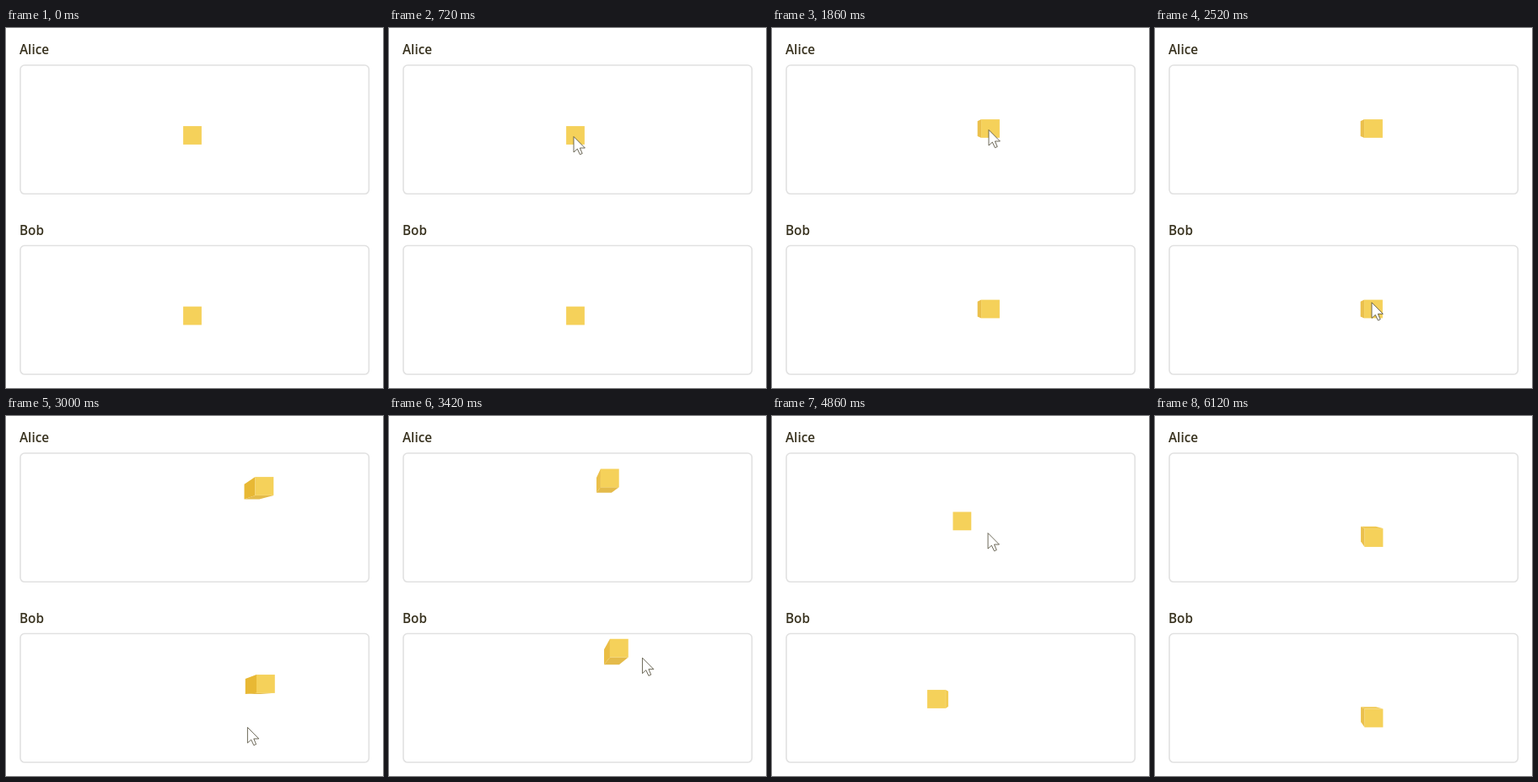
These frames come from a looping animation (447 by 426 pixels, 6180 ms). An HTML page with a canvas:

```html
<!DOCTYPE html>
<html lang="en">
<head>
<meta charset="utf-8">
<title>Shared cube</title>
<style>
html, body { margin: 0; width: 100%; height: 100%; overflow: hidden; background: #fff; }
canvas { display: block; }
</style>
</head>
<body>
<canvas id="stage" width="447" height="426"></canvas>
<script>
const canvas = document.getElementById('stage');
const ctx = canvas.getContext('2d');
const LOOP = 6180, STEP = 60, BLEND = 150;
const PANEL_GAP = 213.5;
const HALF = 10.9, DEPTH = 0.82;
const VANISH = { x: 223.5, y: 120 };
const HOME = { x: 221, y: 127 };

// Each drag circles clockwise on a skewed ellipse, then settles at rest
const drags = [
  { start: 720, until: 1560, center: { x: 246, y: 118 }, rx: 52, ry: 32,
    period: 722, top: 1178, skew: -0.15, rest: { x: 259, y: 119 } },
  { start: 2690, until: 3500, center: { x: 279, y: 108.6 }, rx: 29, ry: 51.5,
    period: 598, top: 2750, skew: 0.185, rest: { x: 306, y: 153 } },
  { start: 4180, until: 4860, center: { x: 249, y: 144 }, rx: 54, ry: 25,
    period: 546, top: 4748, skew: -1.12, rest: { x: 259.5, y: 144 } }
];

// Delay behind the pointer, depending on whose panel it is in
const panels = [
  { name: 'Alice', ownLag: 54, remoteLag: 150 },
  { name: 'Bob', ownLag: 110, remoteLag: 151 }
];

const clamp = v => Math.min(1, Math.max(0, v));
const lerp = (a, b, u) => a + (b - a) * u;
const mix = (p, q, u) => ({ x: lerp(p.x, q.x, u), y: lerp(p.y, q.y, u) });

function ease(t, from, to) {
  const u = clamp((t - from) / (to - from));
  return u * u * (3 - 2 * u);
}

function orbit(d, t) {
  const a = 2 * Math.PI * (t - d.top) / d.period;
  return {
    x: d.center.x + d.rx * Math.sin(a + d.skew),
    y: d.center.y - d.ry * Math.cos(a)
  };
}

function dragAt(t) {
  let pos = HOME;
  for (const d of drags) {
    if (t < d.start) break;
    pos = mix(pos, orbit(d, Math.min(t, d.until)), ease(t, d.start, d.start + BLEND));
    pos = mix(pos, d.rest, ease(t, d.until, d.until + BLEND));
  }
  return pos;
}

function pointerAt(t) {
  const p = dragAt(t);
  const away = 1 - ease(t, 240, 600);
  const inBob = ease(t, 2100, 2580) - ease(t, 3840, 4180);
  const leave = ease(t, 5000, 5300);
  return {
    x: p.x - 2.5 + 31 * away,
    y: p.y + 1 + 244 * away + PANEL_GAP * inBob + 300 * leave
  };
}

function fillPoly(points, color) {
  ctx.beginPath();
  points.forEach(p => ctx.lineTo(p.x, p.y));
  ctx.closePath();
  ctx.fillStyle = color;
  ctx.fill();
}

function drawPanel(name) {
  ctx.fillStyle = '#38321f';
  ctx.font = '600 15.3px "Open Sans", "Noto Sans", sans-serif';
  ctx.fillText(name, 16, 31.3);
  ctx.strokeStyle = '#e1e1e1';
  ctx.lineWidth = 1.6;
  ctx.beginPath();
  ctx.roundRect(17, 44, 413.3, 152.3, 5);
  ctx.stroke();
}

function drawCube({ x, y }) {
  const corner = (sx, sy) => ({ x: x + sx * HALF, y: y + sy * HALF });
  const front = [corner(-1, -1), corner(1, -1), corner(1, 1), corner(-1, 1)];
  const back = front.map(p => mix(VANISH, p, DEPTH));
  const side = (i, j, color) => fillPoly([front[i], front[j], back[j], back[i]], color);
  const turn = clamp((x - 255) / 45);
  const left = `rgb(${lerp(235, 232, turn)}, ${lerp(193, 184, turn)}, ${lerp(78, 52, turn)})`;

  if (back[0].y < front[0].y) side(0, 1, '#f0c850');
  if (back[2].y > front[2].y) side(2, 3, '#e4bb4b');
  if (back[1].x > front[1].x) side(1, 2, '#f2cd56');
  if (back[0].x < front[0].x) side(3, 0, left);
  fillPoly(front, '#f5d15a');
}

function drawPointer({ x, y }) {
  ctx.save();
  ctx.translate(x + 0.5, y + 0.5);
  const arrow = new Path2D('M0 0V18.5L4.3 14.6L7.4 21.2L10.2 20L7.4 13.5H13.4Z');
  ctx.fillStyle = '#fff';
  ctx.fill(arrow);
  ctx.strokeStyle = '#4a4430';
  ctx.lineWidth = 0.8;
  ctx.stroke(arrow);
  ctx.restore();
}

function draw(t) {
  ctx.fillStyle = '#fff';
  ctx.fillRect(0, 0, canvas.width, canvas.height);

  const leader = t >= 2640 && t < 4020 ? 1 : 0;
  panels.forEach((panel, i) => {
    ctx.save();
    ctx.translate(0, i * PANEL_GAP);
    drawPanel(panel.name);
    drawCube(dragAt(t - (i === leader ? panel.ownLag : panel.remoteLag)));
    ctx.restore();
  });

  if (t >= 240 && t < 5340) drawPointer(pointerAt(t));
}

const start = performance.now();
function tick() {
  const t = (performance.now() - start) % LOOP;
  draw(Math.floor(t / STEP) * STEP);
  requestAnimationFrame(tick);
}
tick();
</script>
</body>
</html>
```
